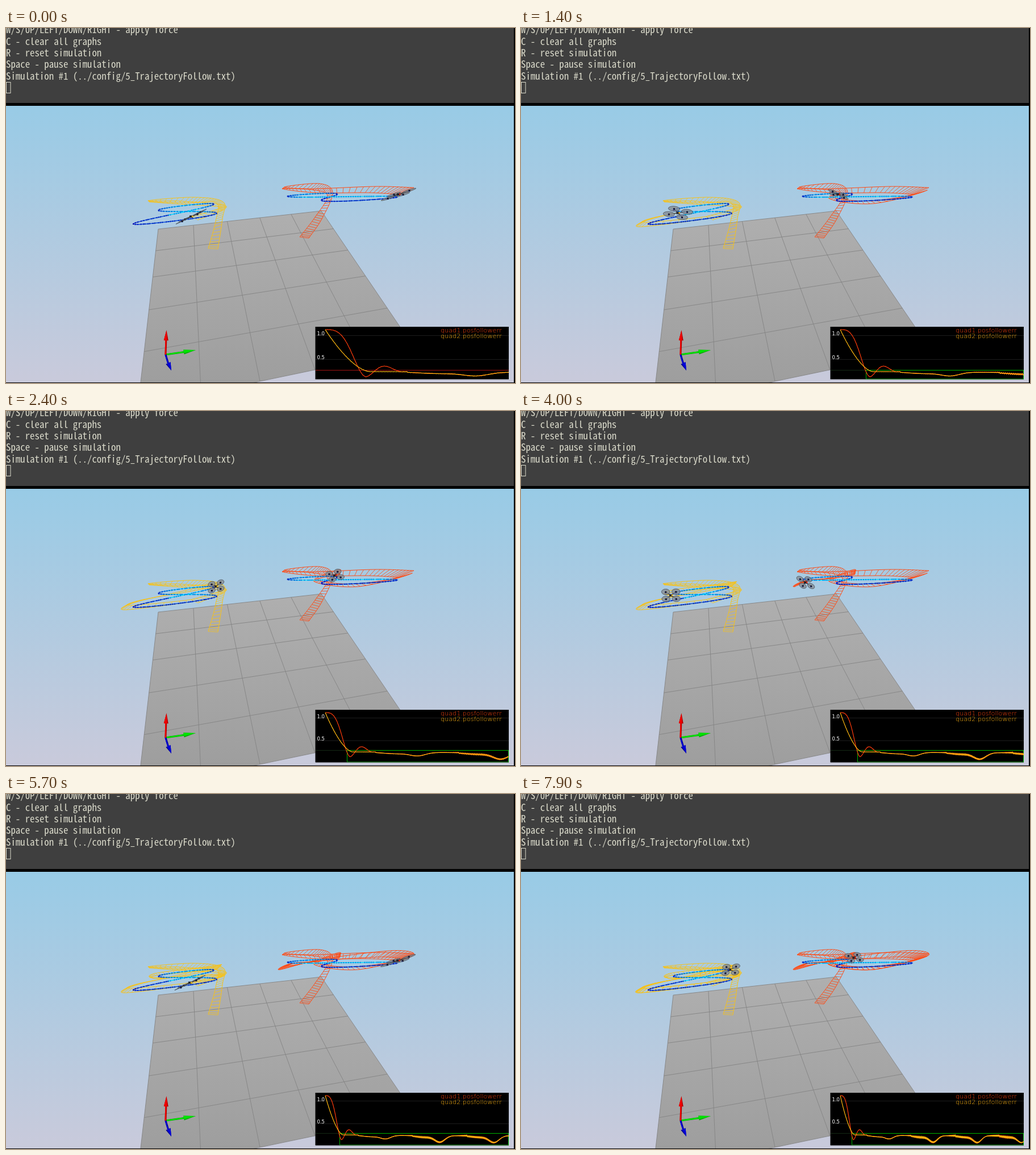
An HTML page with a canvas that plays this animation: 896x625 px, repeating every 8 s.

```html
<!DOCTYPE html>
<html lang="en">
<head>
<meta charset="utf-8">
<title>Trajectory follow simulation</title>
<style>
  html, body { margin: 0; width: 100%; height: 100%; overflow: hidden; background: #000; }
  canvas, svg { position: absolute; left: 0; top: 0; width: 896px; height: 625px; }
  .term { font: 16.84px "Noto Sans Mono CJK JP", "Noto Sans Mono CJK SC", "Noto Sans Mono CJK KR", monospace; fill: #dcdccc; white-space: pre; }
  .key { font: 200 11.2px "DejaVu Sans", sans-serif; }
  .tick { font: 8.5px "DejaVu Sans", sans-serif; fill: #fff; }
</style>
</head>
<body>
<canvas id="view" width="896" height="625"></canvas>
<svg viewBox="0 0 896 625">
  <g class="term">
    <text x="0" y="9">W/S/UP/LEFT/DOWN/RIGHT - apply force</text>
    <text x="0" y="29.5">C - clear all graphs</text>
    <text x="0" y="50">R - reset simulation</text>
    <text x="0" y="70.3">Space - pause simulation</text>
    <text x="0" y="90.6">Simulation #1 (../config/5_TrajectoryFollow.txt)</text>
  </g>
  <rect x=".5" y="95.5" width="7.5" height="19" fill="none" stroke="#dcdccc"/>
  <text class="key" x="765" y="536" fill="#ff4510">quad1.posfollowerr</text>
  <text class="key" x="765" y="545.5" fill="#ffb414">quad2.posfollowerr</text>
  <text class="tick" x="547.5" y="541">1.0</text>
  <text class="tick" x="547.5" y="583" id="half">0.5</text>
</svg>
<script>
const LOOP = 8000, LAP = 5685, TAU = 2 * Math.PI;
const { sin, cos, exp, min, max, floor, hypot } = Math;

// The picture steps every 100 ms, rests, then steps unevenly.
const STOPS = [4000, 4100, 4300, 4600, 4800, 5000, 5200, 5500, 5700, 5900,
  6100, 6400, 6600, 6900, 7100, 7400, 7700, 7900];
const snap = t => t < 2500 ? floor(t / 100) * 100 : STOPS.reduce((a, s) => s <= t ? s : a, 2400);

// path and tilt (arm A, arm B): evenly timed points of one lap.
// start: the ribbon's two edges from take-off on.  ref: the wanted figure eight.
const quads = [{
  color: '#ff4a14', core: '#f02818',
  path: [[691, 293], [612, 304.5], [549, 298], [580, 288], [585, 288.5], [545, 295], [512, 297], [500, 302], [562, 293], [664, 287]],
  tilt: [[19, -7, 8, 0], [8.5, 0, 10, 5.5], [4, -9.5, 10, 2], [6, -5, 9.5, 6.5]],
  start: [[517, 368, 533, 370], [544, 333, 556, 336], [566, 296, 575, 290], [540, 285, 552, 274],
    [486, 283, 490, 280], [545, 290, 540, 283], [640, 290, 650, 279], [690, 293, 718, 281]],
  ribbon: p => [p[0] + .22 * (p[0] - 580), p[1] + .8 * (p[1] - 297) - .04 * (p[0] - 580)],
  ref: a => [583 + 53.5 * cos(a) + 31 * sin(a) + 51 * cos(2 * a), 297.7 + 2.8 * cos(a) + 3.8 * sin(a) - 3.5 * cos(2 * a)],
  near: 298.5
}, {
  color: '#f6c21a', core: '#ffc41c',
  path: [[326, 332], [220, 342], [237, 333], [327, 317], [370.5, 309], [342, 312], [268, 319], [263, 324.5], [319, 322], [376, 320.5]],
  tilt: [[16, -8, 11, -4.5], [16, -2, 7, 7.5], [5, -9, 8.5, 2.5], [10, -6, 9.5, 6]],
  start: [[356, 388, 373, 389], [369, 340, 381, 336], [370, 308, 382, 306], [320, 308, 330, 298],
    [252, 306, 250, 304], [318, 311, 312, 305], [376, 316, 388, 314], [326, 332, 338, 338]],
  ribbon: p => [p[0] + .13 * (p[0] - 300), p[1] + .5 * (p[1] - 326)],
  ref: a => [306.8 - 22 * cos(a) - 2.5 * sin(a) - 60.8 * cos(2 * a), 326 + 12 * cos(a) - 8 * sin(a) + 7 * cos(2 * a)],
  near: 329
}];

function spline(rows, u, closed) {
  const n = rows.length, i = floor(u), f = u - i;
  const row = k => rows[closed ? (k + n) % n : max(0, min(n - 1, k))];
  const p = row(i - 1), a = row(i), b = row(i + 1), q = row(i + 2);
  return a.map((v, k) => v + f / 2 * (b[k] - p[k] + f * (2 * p[k] - 5 * v + 4 * b[k] - q[k]
    + f * (3 * (v - b[k]) + q[k] - p[k]))));
}
const lapAt = (rows, t) => spline(rows, t % LAP / LAP * rows.length, true);

function stroke(c, points, color, width = 1) {
  c.beginPath();
  points.forEach(p => c.lineTo(p[0], p[1]));
  c.strokeStyle = color;
  c.lineWidth = width;
  c.stroke();
}
function shape(c, points, fill) {
  c.beginPath();
  points.forEach(p => c.lineTo(p[0], p[1]));
  c.closePath();
  c.fillStyle = fill;
  c.fill();
}
function ramp(c, y0, y1, a, b) {
  const g = c.createLinearGradient(0, y0, 0, y1);
  g.addColorStop(0, a);
  g.addColorStop(1, b);
  return g;
}

// Perspective map of the unit square onto the floor.
function floorPoint(s, t) {
  const g = .1009, h = -.446, w = 1 + g * s + h * t;
  return [(268 + (287 + 555 * g) * s + (-36 + 232 * h) * t) / w,
    (354 + (-32 + 322 * g) * s + (313 + 667 * h) * t) / w];
}
function arrow(c, x, y, bx, by, size, color, shade) {
  const d = hypot(x - bx, y - by), nx = (by - y) / d * size, ny = (x - bx) / d * size;
  stroke(c, [[281, 575], [bx, by]], shade, 3);
  stroke(c, [[280.5, 575], [bx - .5, by]], color, 2);
  shape(c, [[x, y], [bx + nx, by + ny], [bx - nx, by - ny]], shade);
  shape(c, [[x, y], [bx + nx * .5, by + ny * .5], [bx - nx, by - ny]], color);
}
function drawScene(c) {
  c.fillStyle = '#000';
  c.fillRect(0, 0, 896, 625);
  c.fillStyle = '#3f3f3f';
  c.fillRect(0, 0, 894, 132);
  c.fillStyle = ramp(c, 136, 624, '#98cbe6', '#c9cadb');
  c.fillRect(0, 137, 894, 487);
  c.save();
  c.beginPath();
  c.rect(0, 137, 894, 487);
  c.clip();
  shape(c, [floorPoint(0, 0), floorPoint(1, 0), floorPoint(1, 1), floorPoint(0, 1)], ramp(c, 322, 624, '#afafaf', '#9e9e9e'));
  for (let i = 0; i <= 5; i++) {
    stroke(c, [floorPoint(i / 5, 0), floorPoint(i / 5, 1)], '#848484', .9);
    stroke(c, [floorPoint(0, i / 5), floorPoint(1, i / 5)], '#848484', .9);
  }
  arrow(c, 334, 567, 313, 570.5, 4, '#00e400', '#00a800');
  arrow(c, 291, 603, 285.5, 590, 4.5, '#0000d8', '#000090');
  arrow(c, 282.5, 532, 281.8, 550, 4, '#f00000', '#a80000');
  c.restore();
}

// A ladder: two edges and a rung at every second row.
function ladder(c, rows, color) {
  stroke(c, rows, color);
  stroke(c, rows.map(r => [r[2], r[3]]), color);
  rows.forEach((r, i) => {
    if (i % 2 == 0) stroke(c, [[r[0], r[1]], [r[2], r[3]]], color, .8);
  });
}
function drawStart(c, q) {
  const rows = [], steps = 20;
  for (let i = 0; i <= (q.start.length - 1) * steps; i++) rows.push(spline(q.start, i / steps));
  ladder(c, rows, q.color);
}
function drawLap(c, q, time, shift) {
  const rows = [];
  for (let t = 0; t <= time; t += 30) {
    const p = lapAt(q.path, t);
    p[0] -= shift;
    rows.push([...p, ...q.ribbon(p)]);
  }
  ladder(c, rows, q.color);
}

// Blue where slow or near, cyan where fast and far.
function drawRef(c, q) {
  const steps = 240;
  let last = q.ref(0), run = 0;
  for (let i = 1; i <= steps; i++) {
    const p = q.ref(i / steps * TAU), d = hypot(p[0] - last[0], p[1] - last[1]);
    const v = min(1, d / 3) * (p[1] < q.near ? 1 : .25);
    stroke(c, [last, p], `rgb(0,${20 + 200 * v},${205 + 50 * v})`, 1.5);
    run += d;
    if (run > 4.5) {
      run -= 4.5;
      c.fillStyle = `rgb(0,${90 * v},${160 + 60 * v})`;
      c.fillRect(p[0] - 1, p[1] - 1, 2, 2);
    }
    last = p;
  }
}

function drawQuad(c, q, time) {
  const [x, y] = lapAt(q.path, time), [ax, ay, bx, by] = lapAt(q.tilt, time);
  const hubs = [[ax, ay], [bx, by], [-ax, -ay], [-bx, -by]].sort((m, n) => m[1] - n[1]);
  for (const [hx, hy] of hubs) stroke(c, [[x, y], [x + hx, y + hy]], '#34383e', 1.4);
  for (const [hx, hy] of hubs) {
    c.save();
    c.transform(ax, ay, bx, by, x + hx, y + hy);
    c.beginPath();
    c.arc(0, 0, .57, 0, 7);
    c.restore();
    c.fillStyle = 'rgba(132,140,150,.8)';
    c.fill();
    c.strokeStyle = '#4a4f55';
    c.lineWidth = .8;
    c.stroke();
    c.fillStyle = '#15151f';
    c.fillRect(x + hx - 1.5, y + hy - 1, 3, 3);
    c.fillStyle = '#1c2c90';
    c.fillRect(x + hx - 1.5, y + hy + .5, 1.5, 1.5);
  }
  c.fillStyle = '#26262c';
  c.fillRect(x - 3, y - 2, 6, 4);
  c.fillStyle = q.core;
  c.fillRect(x + 1, y - 1.5, 2.5, 2.5);
}

// Second quad: a steady fall, then a dip on each return of the lap.
function slowError(s) {
  const d = (s + 1.525) % 3.85 - 1.925;
  const fall = 73.5 * max(0, 1 - s / 1.25) ** 1.6;
  const dip = s < 2.3 ? 0 : min(12, 1.4 * s) * exp(-((d / .5) ** 2)) + 3 * exp(-(((d + 1) / .9) ** 2));
  return 604.5 - fall + dip + min(2, s * .3);
}
// First quad: an eased fall that overshoots and rings before it joins the other.
function fastError(s) {
  const low = 1.16, d = s - low;
  if (d < 0) return 572.5 - 41.5 * cos(Math.PI * (s / low) ** 1.6);
  return d < 1.04 ? 602 + 12 * exp(-1.1 * d) * cos(TAU * d / 1.1) : slowError(s);
}
const jitter = s => s < 5.6 ? .15 : 1.4 * Math.abs(sin((s - 5.6) * .9));

function drawChart(c, time) {
  const f = max(0, min(1, (time - 1800) / 500)), k = 1 - .065 * f;
  const span = 5.2 + 1.365 * time / 1000;
  const mapX = s => 562 + 323 * s / span, mapY = y => 531 + (y - 531) * k;
  half.setAttribute('y', mapY(583).toFixed(1));
  c.save();
  c.beginPath();
  c.rect(544.5, 526, 340.5, 92.5);
  c.clip();
  c.fillStyle = '#000';
  c.fillRect(544, 526, 342, 93);
  const row = y => Math.round(mapY(y)) + .5;
  const level = (y, color) => stroke(c, [[545, row(y)], [885, row(y)]], color);
  [541, 583, 624].forEach(y => level(y, '#1c1c1c'));
  const limit = 601.5;
  if (time < 1000) level(limit, '#a01212');
  else {
    const x = Math.round(mapX(1)) + .5, y = row(limit);
    level(limit, '#142814');
    c.strokeStyle = '#00b400';
    c.lineWidth = 1;
    c.strokeRect(x, y, 884.5 - x, 618 - y);
  }
  [[fastError, '#ff3c0c'], [slowError, '#ffb810']].forEach(([error, color], n) => {
    const line = [];
    for (let s = 0; s < span; s += .02) line.push([mapX(s), mapY(error(s)) + jitter(s) * sin(s * 78 + n * 2)]);
    stroke(c, line, color, 1.2);
  });
  c.restore();
}

const half = document.getElementById('half');
const ctx = document.getElementById('view').getContext('2d');
const backdrop = document.createElement('canvas');
backdrop.width = 896;
backdrop.height = 625;
const back = backdrop.getContext('2d');
drawScene(back);
quads.forEach(q => drawStart(back, q));

let shown = -1;
function draw(now) {
  const t = snap(now % LOOP);
  if (t !== shown) {
    shown = t;
    ctx.drawImage(backdrop, 0, 0);
    for (const q of quads) {
      drawLap(ctx, q, min(t, LAP), 0);
      if (t > LAP) drawLap(ctx, q, t - LAP, 1);
      drawRef(ctx, q);
      drawQuad(ctx, q, t);
    }
    drawChart(ctx, t);
  }
  requestAnimationFrame(draw);
}
draw(performance.now());
</script>
</body>
</html>
```
